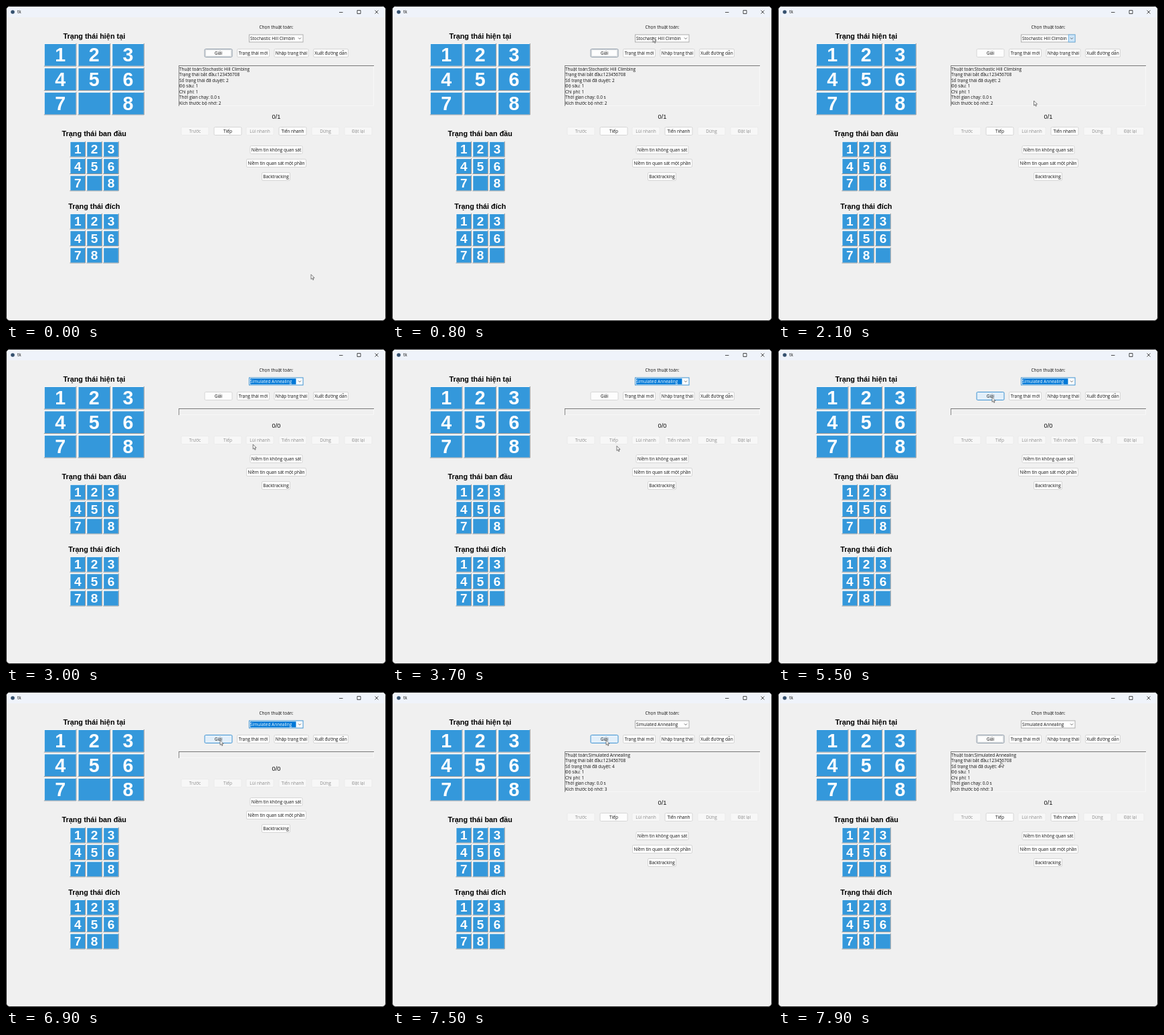
Animation of 568 by 472 pixels, one loop 8 s. Source, as an HTML page:

```html
<!DOCTYPE html>
<html lang="vi">
<head>
<meta charset="utf-8">
<title>tk</title>
<style>
  html, body { margin: 0; width: 100%; height: 100%; overflow: hidden; background: #000; }
  svg { display: block; width: 568px; height: 472px; }
  text { font: 6.5px "Open Sans", "Noto Sans", sans-serif; fill: #111; white-space: pre; }
  .bold { font: bold 10.85px "Liberation Sans", Arial, sans-serif; fill: #000; }
  .step { font: 9.33px "Liberation Sans", Arial, sans-serif; }
  .mid { text-anchor: middle; }
  .btn rect { fill: #fdfdfd; stroke: #d6d6d6; }
  .btn .ring { display: none; }
  .btn.off rect { fill: #f7f7f7; stroke: #ebebeb; }
  .btn.off text { fill: #8d8d8d; }
  .btn.focus rect { stroke: #8795a3; }
  .btn.focus .ring { display: inline; fill: none; stroke: #c4c8cc; stroke-width: .6; }
  .btn.hover rect { fill: #e2effa; stroke: #3f93d2; }
  .btn.hover .ring { display: none; }
</style>
</head>
<body>
<svg id="stage" viewBox="0 0 568 472"></svg>
<script>
const LOOP = 8000, STEP = 100;
const OPEN = 1000, PICK = 2800, ENTER = 4600, SOLVED = 7500, LEAVE = 7900;
const COLLAPSE = -51;

// Pointer path: time, x, y
const PATH = [
  [0, 456, 402], [100, 460, 408], [300, 480, 439], [500, 431, 286], [700, 393, 72],
  [800, 390, 47], [900, 391, 47], [1200, 398, 47], [1300, 398, 47], [1700, 393, 88],
  [2100, 382.5, 141.7], [2800, 382.5, 141.7], [3500, 336, 145], [3700, 336, 145],
  [4000, 306, 122], [4200, 299, 101], [4500, 309, 83], [4700, 312, 76],
  [5000, 320, 72], [7800, 320, 72], [7900, 333, 105]
];

const stage = document.getElementById("stage");

function add(parent, tag, attrs = {}, content) {
  const node = document.createElementNS("http://www.w3.org/2000/svg", tag);
  for (const key in attrs) node.setAttribute(key, attrs[key]);
  if (content !== undefined) node.textContent = content;
  return parent.appendChild(node);
}
const group = (parent, attrs) => add(parent, "g", attrs);
const box = (parent, x, y, width, height, fill, more) =>
  add(parent, "rect", { x, y, width, height, fill, ...more });
const line = (parent, d, stroke, width = 1) =>
  add(parent, "path", { d, stroke, fill: "none", "stroke-width": width });
const label = (parent, x, y, content, cls = "") =>
  add(parent, "text", { x, y, class: cls }, content);
const show = (node, on) => node.setAttribute("display", on ? "inline" : "none");

function button(parent, cx, cy, width, content) {
  const g = group(parent, { class: "btn" });
  add(g, "rect", { x: cx - width / 2, y: cy - 6, width, height: 12, rx: 1.5 });
  add(g, "rect", { class: "ring", x: cx - width / 2 + 1.5, y: cy - 4.5, width: width - 3, height: 9 });
  label(g, cx, cy + 2.3, content, "mid");
  return g;
}

function board(title, titleY, cells, x0, y0, w, h, dx, dy, size) {
  label(stage, 131.8, titleY, title, "bold mid");
  [...cells].forEach((cell, i) => {
    const x = x0 + (i % 3) * dx, y = y0 + Math.floor(i / 3) * dy;
    line(stage, `M${x - .5} ${y + h}V${y - .5}H${x + w}`, "#fafafa");
    line(stage, `M${x - 1} ${y + h + .5}H${x + w + .5}V${y - 1}`, "#999");
    box(stage, x, y, w, h, "#3498db");
    if (cell === "0") return;
    const digit = label(stage, x + w / 2, y + h / 2 + size * .35, cell, "bold mid");
    digit.style.fontSize = size + "px";
    digit.style.fill = "#fff";
  });
}

function drawWindow() {
  box(stage, 0, 0, 568, 472, "#000");
  box(stage, .5, .5, 567, 471, "#f0f0f0", { rx: 5, stroke: "#222" });
  add(stage, "path", { d: "M1 17V6Q1 1 6 1H562Q567 1 567 6V17Z", fill: "#eff3fa" });
  add(stage, "circle", { cx: 10, cy: 9, r: 2.8, fill: "#34506e" });
  label(stage, 17, 11.2, "tk");
  line(stage, "M498 9.5H503.5M525 6.5H530V11.5H525ZM551.5 6.5L556.5 11.5M556.5 6.5L551.5 11.5", "#222", .8);
}

drawWindow();
board("Trạng thái hiện tại", 49, "123456708", 57.8, 57, 46.6, 32.6, 50.7, 36.4, 28.6);
board("Trạng thái ban đầu", 195, "123456708", 96.4, 203.8, 21.6, 21.8, 24.9, 25.4, 19);
board("Trạng thái đích", 303.6, "123456780", 96.4, 311.9, 21.6, 21.8, 24.9, 25.4, 19);

// Algorithm picker
label(stage, 404, 34, "Chọn thuật toán:", "mid");
const combo = box(stage, 363.5, 43, 80.5, 11, "#fff", { stroke: "#adadad" });
const mark = box(stage, 365, 44.3, 68.5, 8.6, "#0078d7");
const arrowBox = box(stage, 434.3, 43, 9.7, 11, "#cfe6f8", { stroke: "#6fb2e2" });
line(stage, "M437 47.5L439 49.5L441 47.5", "#444", .8);
const choice = label(stage, 365, 51, "");

const solve = button(stage, 317.5, 70.5, 41, "Giải");
button(stage, 369.5, 70.5, 48, "Trạng thái mới");
button(stage, 426.5, 70.5, 51, "Nhập trạng thái");
button(stage, 485.5, 70.5, 52, "Xuất đường dẫn");

// Result panel
const panel = group(stage);
const panelLeft = line(panel, "", "#8a8a8a");
const panelRight = line(panel, "", "#f7f7f7");
line(panel, "M258 89.5H550", "#777");
const report = group(panel);
const rows = Array.from({ length: 7 }, (_, i) => label(report, 259, 96.8 + i * 8.5, ""));

// Controls that follow the panel height
const lower = group(stage);
const counter = label(lower, 404, 168.5, "", "step mid");
const nav = ["Trước", "Tiếp", "Lùi nhanh", "Tiến nhanh", "Dừng", "Đặt lại"]
  .map((name, i) => button(lower, 282.5 + Math.round(i * 48.7), 187.5, 41, name));
button(lower, 404, 215.5, 78, "Niềm tin không quan sát");
button(lower, 404, 235.5, 89, "Niềm tin quan sát một phần");
button(lower, 403.5, 255.5, 42, "Backtracking");

const pointer = add(stage, "path", {
  d: "M0 .3V7.4L1.6 5.9L2.8 8.5L3.9 8L2.8 5.4H5Z",
  fill: "#fff", stroke: "#444", "stroke-width": .7
});

function pointerAt(t) {
  const i = PATH.findIndex(p => p[0] > t);
  if (i < 0) return PATH[PATH.length - 1].slice(1);
  const [t0, x0, y0] = PATH[i - 1], [t1, x1, y1] = PATH[i];
  const k = (t - t0) / (t1 - t0);
  return [x0 + (x1 - x0) * k, y0 + (y1 - y0) * k];
}

function reportLines(name, visited, memory) {
  return [`Thuật toán:${name}`, "Trạng thái bắt đầu:123456708",
    `Số trạng thái đã duyệt: ${visited}`, "Độ sâu: 1", "Chi phí: 1",
    "Thời gian chạy: 0.0 s", `Kích thước bộ nhớ: ${memory}`];
}

function render(t) {
  const picked = t >= PICK, solved = t >= SOLVED, empty = picked && !solved;
  const bottom = empty ? 99 : 150;

  choice.textContent = picked ? "Simulated Annealing" : "Stochastic Hill Climbin";
  choice.style.fill = empty ? "#fff" : "#111";
  combo.setAttribute("stroke", empty ? "#3f93d2" : "#adadad");
  show(mark, empty);
  show(arrowBox, t >= OPEN && !picked);

  solve.classList.toggle("focus", t < OPEN || solved);
  solve.classList.toggle("hover", t >= ENTER && t < LEAVE);

  panelLeft.setAttribute("d", `M258.5 89V${bottom}`);
  panelRight.setAttribute("d", `M259 ${bottom - .5}H549.5V90`);
  show(report, !empty);
  const lines = solved ? reportLines("Simulated Annealing", 4, 3)
    : reportLines("Stochastic Hill Climbing", 2, 2);
  rows.forEach((row, i) => row.textContent = lines[i]);

  lower.setAttribute("transform", `translate(0 ${empty ? COLLAPSE : 0})`);
  counter.textContent = empty ? "0/0" : "0/1";
  nav.forEach((b, i) => b.classList.toggle("off", empty || (i !== 1 && i !== 3)));

  pointer.setAttribute("transform", `translate(${pointerAt(t).join(" ")})`);
}

const start = performance.now();
function tick() {
  const t = (performance.now() - start) % LOOP;
  render(Math.floor(t / STEP) * STEP);
  requestAnimationFrame(tick);
}
tick();
</script>
</body>
</html>
```
